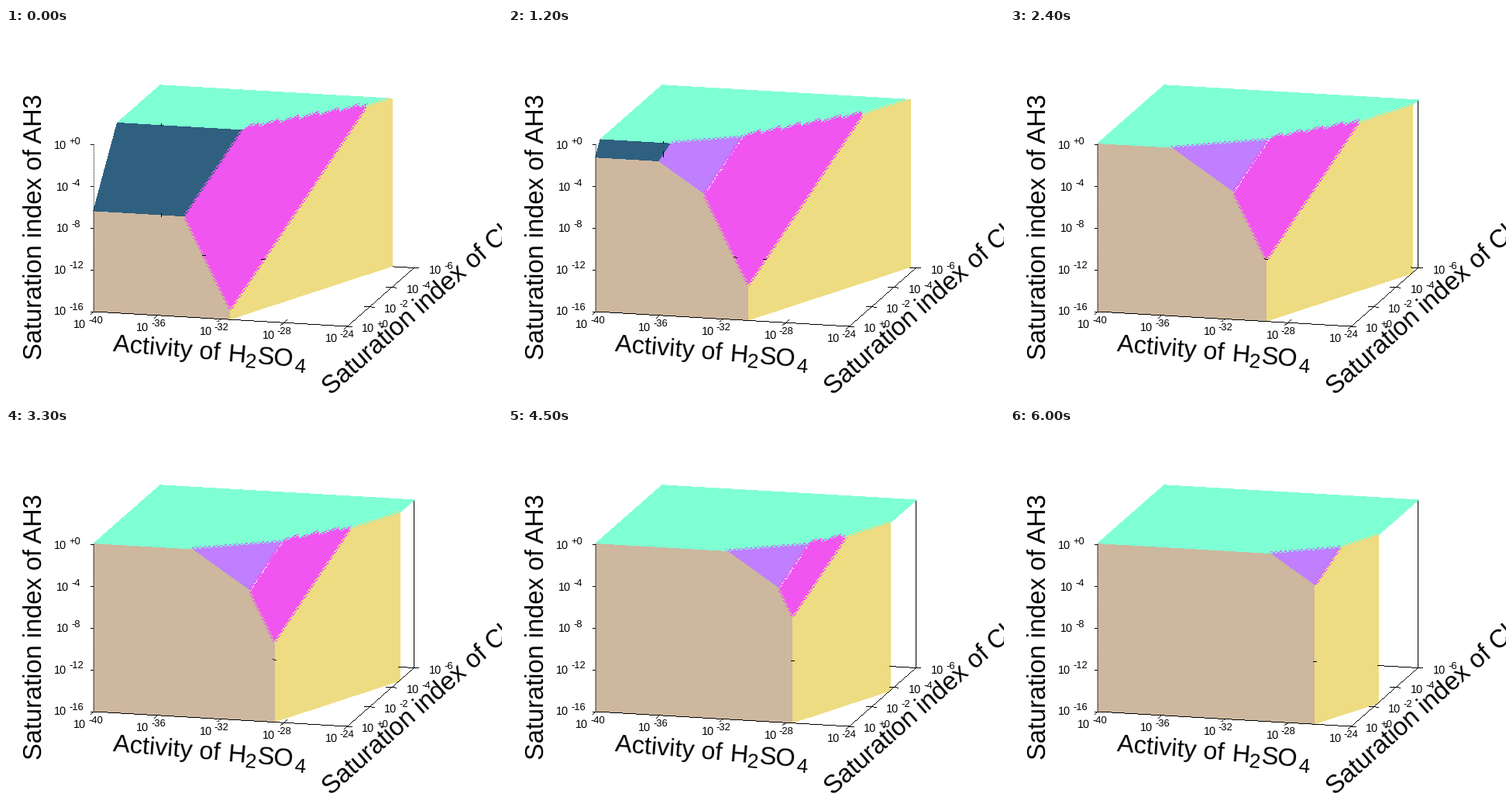
These frames come from a looping animation (640 px wide and 480 px high, 6300 ms). A matplotlib script:

```python
import numpy as np
import matplotlib.pyplot as plt
from matplotlib.animation import FuncAnimation
from matplotlib.colors import to_rgb

W, H, DPI = 640, 480, 100
STEPS, INTERVAL = 21, 300

plt.rcParams["font.family"] = "Liberation Sans"
plt.rcParams["text.hinting"] = "none"

# Parallel projection of the unit box (activity a, depth c, height h)
ORIGIN = np.array([113, 365.5])
A, C, UP = np.array([327, 19]), np.array([86, -75.5]), np.array([0, -216])
PAD = 0.004

# View ray in box units, scaled so that depth is the ray parameter
RAY_A = -C[0] / A[0]
RAY = np.array([RAY_A, 1, (A[1] * RAY_A + C[1]) / -UP[1]])


class Face:
    """Plane n.(a, c, h) = start + rate * step bounding the solid."""

    def __init__(self, color, normal, start, rate=0, rough=0):
        self.rgb = to_rgb(color)
        self.n, self.start, self.rate = np.array(normal), start, rate
        self.rough = rough
        self.speed = -self.n @ RAY
        na, _, nh = self.n
        self.grad = np.array([na / A[0] - nh * A[1] / A[0] / UP[1],
                              nh / UP[1]]) / self.speed

    def entry(self, k):
        level = self.n[0] * a0 + self.n[2] * h0
        return (level - self.start - self.rate * k) / self.speed


TEAL, YELLOW, TAN, PURPLE, DARK, PINK, OPEN = range(7)
FACES = [
    Face("#7fffd4", (0, 0, 1), 1 + PAD, rough=1),
    Face("#eedc82", (1, -0.375, 0), 0.538, 0.0159, rough=1),
    Face("#cdb79e", (0, -1, 0), 0),
    Face("#bf7fff", (1, -1.5, 1), 1.037, 0.0325, rough=1),
    Face("#2f607f", (0, -1.125, 1), 0.6, 0.08),
    Face("#f055f0", (3, -2.25, 1), 1.68, 0.0862, rough=2),
    Face("white", (1, 0, 0), 1 + PAD),
]
RGB = np.array([f.rgb for f in FACES])
ROUGH = np.array([f.rough for f in FACES])
GRAD = np.array([f.grad for f in FACES])
# Pixels per unit of ray gap, for every pair of faces
SPREAD = np.linalg.norm(GRAD[:, None] - GRAD, axis=2) + 1e-9

Y, X = np.mgrid[:H, :W]
a0 = (X - ORIGIN[0]) / A[0]
h0 = (Y - ORIGIN[1] - A[1] * a0) / UP[1]
leave = np.minimum.reduce([np.full((H, W), 1 + PAD),
                           (a0 + PAD) / -RAY[0], h0 / -RAY[2]])

teeth = 2.8 * ((X // 3 + Y // 2) % 2)
lumps = 4 * ((X - 300) % 26) / 26
speckle = np.random.default_rng(4).random((H, W)) < 0.25


def project(a, c, h):
    return ORIGIN + a * A + c * C + h * UP


def stroke(mask, p, q):
    p, q = np.asarray(p), np.asarray(q)
    n = int(np.abs(q - p).max()) + 1
    x, y = np.rint(np.linspace(p, q, n)).astype(int).T
    mask[y, x] = True


def tick(mask, p, d, e):
    stroke(mask, p - np.array(d), p + np.array(e))


front, back, post, left_edge = (np.zeros((H, W), bool) for _ in range(4))
stroke(front, project(0, 0, 0), project(0, 0, 1))
stroke(front, project(0, 0, 0), project(1, 0, 0))
stroke(back, project(1, 0, 0), project(1, 1, 0))
stroke(back, project(0, 1, 0), project(1, 1, 0))
stroke(post, project(1, 1, 0), project(1, 1, 1))
stroke(left_edge, project(0, 1, 0) + (1, 0), project(0, 1, 1) + (1, 0))

fig = plt.figure(figsize=(W / DPI, H / DPI), dpi=DPI, facecolor="white")
ax = fig.add_axes([0, 0, 1, 1])
ax.axis("off")
canvas = ax.imshow(np.ones((H, W, 3)), extent=(0, W, H, 0), aspect="auto",
                   interpolation="nearest")


def label(x, y, s, px, angle=0):
    ax.text(x, y, s, fontsize=px * 72 / DPI, rotation=angle, color="black",
            rotation_mode="anchor", ha="left", va="baseline")


def power(x, y, exp):
    label(x, y, "10", 14.5)
    label(x + 19, y - 6, f"{exp:+d}", 13)


for i in range(5):
    f = i / 4
    tick(front, project(0, 0, 1 - f), (4, 0), (0, 0))
    exp = -4 * i
    power(62 + 3 * (exp in (-4, -8)), 156 + 53.5 * i, exp)
    tick(back, project(f, 0, 0), (4, -3.5), (4, -3.5))
    power(87 + 81.2 * i, 386.5 + 4.7 * i, 4 * i - 40)
for i in range(4):
    tick(back, project(1, i / 3, 0), (7, 0.4), (6, 0.4))
    power(459 + 29 * i, 391.5 - 25 * i, -2 * i)

label(47, 428, "Saturation index of AH3", 32.6, 90)
label(138, 416, "Activity of", 32.4, -4.8)
label(285.5, 429.5, "H", 32.4, -4.8)
label(308, 438, "2", 26, -4.8)
label(324, 432.5, "SO", 32.4, -4.8)
label(371.5, 443.5, "4", 26, -4.8)
label(420, 474.5, "Saturation index of Cl", 32.6, 41.5)


def render(k):
    entry = np.array([f.entry(k) for f in FACES])
    order = np.argsort(-entry, axis=0)
    top, second = order[0], order[1]
    enter = entry.max(axis=0)
    solid = enter <= leave
    gap = enter - np.take_along_axis(entry, order[1:2], 0)[0]
    dist = gap / SPREAD[top, second]

    # Rough seams: the later face bites into the earlier one
    bite = teeth + lumps * ((top == TEAL) & (second == PINK))
    rough = ROUGH[top] + ROUGH[second] >= 2
    face = np.where(rough & (top < second) & (dist < bite), second, top)

    img = RGB[face]
    img[~solid] = 1
    pair = np.minimum(top, second), np.maximum(top, second)
    img[(pair[0] == PURPLE) & (pair[1] == PINK) & (dist < 1) & speckle] = 1

    # Hidden edges shine through the seams
    seam = solid & (dist < 2.2)
    dark = (top == DARK) | (second == DARK)
    clear = ~solid | (face == OPEN)
    img[back & (clear | seam)] = 0
    img[left_edge & seam & dark] = 0
    if solid[97, 521]:
        img[post & clear] = 0
    img[front] = 0
    return img


def update(k):
    canvas.set_data(render(k))
    return [canvas]


anim = FuncAnimation(fig, update, frames=STEPS, interval=INTERVAL,
                     repeat=True, repeat_delay=0, blit=False)
plt.show()
```
